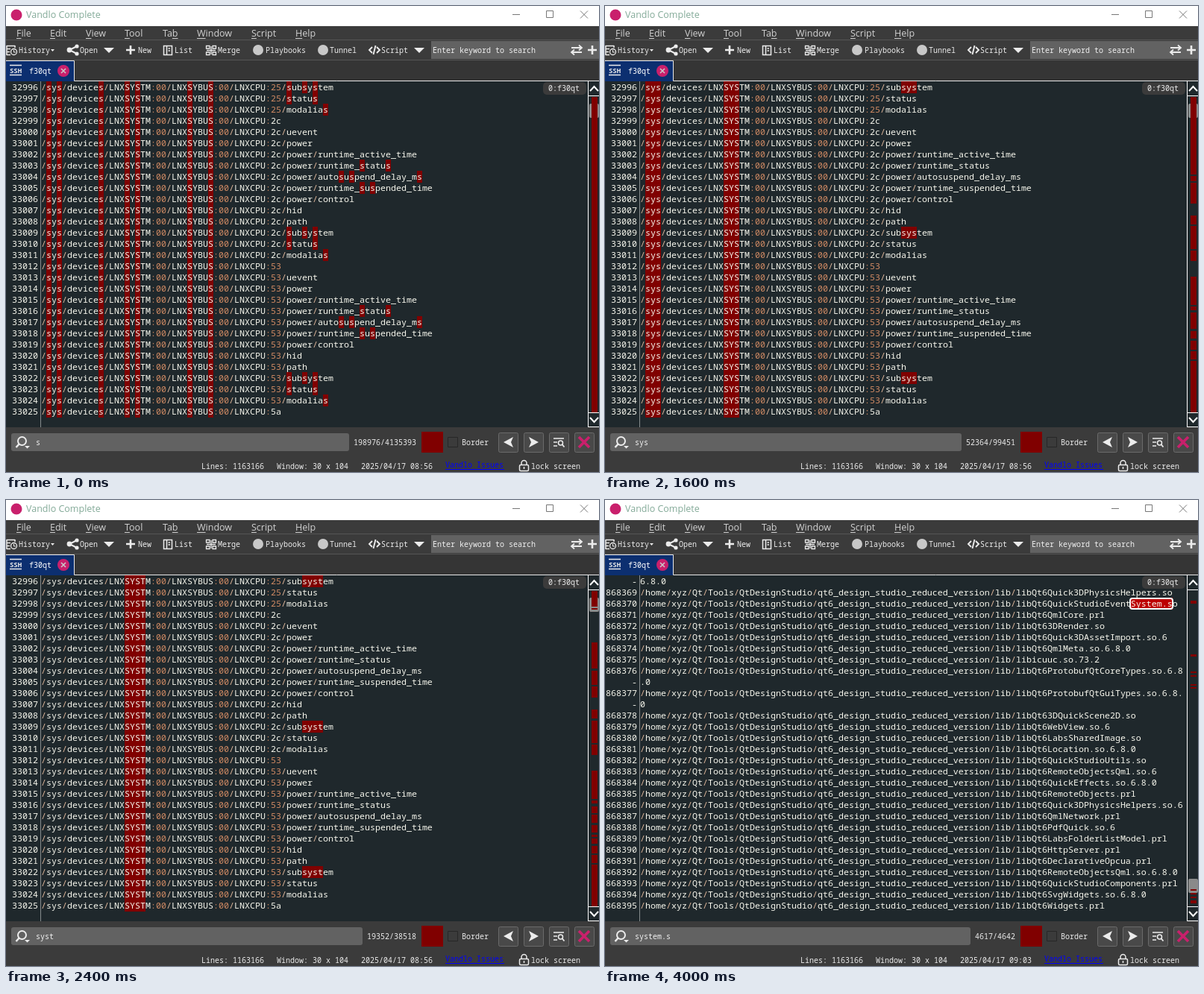
An HTML page with a canvas for the animation above (4800 ms loop, 795 px wide and 625 px high).

```html
<!DOCTYPE html>
<html lang="en">
<head>
<meta charset="utf-8">
<title>Terminal search</title>
<style>
html, body { margin: 0; width: 100%; height: 100%; overflow: hidden; background: #3b3b3b; }
canvas { display: block; }
</style>
</head>
<body>
<canvas id="stage" width="795" height="625"></canvas>
<script>
const ctx = document.getElementById('stage').getContext('2d');
const STEP = 800, COLS = 104, CELL = 7, ROW = 15, LEFT = 47, TOP = 102;
const MONO = '"Noto Sans Mono", "Liberation Mono", monospace';
const SMALL = `10px ${MONO}`, TERM = `11.667px ${MONO}`, UI = '12.5px "Open Sans", sans-serif';
const PANEL = '#3b3b3b', FIELD = '#626262', SCREEN = '#1f282c', RED = '#800000';
const LIGHT = '#ececec', CREAM = '#f8f8ee', ORANGE = '#d08a63', PINK = '#c9206c';

// Search steps: query, hit counter, marks on the scroll bar as [top, bottom].
const FULL = [[122, 545]];
const SYST = [[122, 143], [145, 147], [191, 226], [229, 248], [250, 265], [281, 293], [296, 326],
  [328, 342], [363, 401], [403, 407], [411, 420], [422, 433], [436, 446], [449, 452],
  [454, 461], [464, 474], [476, 487], [489, 545]];
const STEPS = [
  { query: 's', count: '198976/4135393', marks: FULL },
  { query: 'sy', count: '65970/138634', marks: [[122, 226], [228, 234], [236, 265], [281, 325], [328, 545]], caret: true },
  { query: 'sys', count: '52364/99451', marks: [[122, 226], [228, 235], [237, 265], [281, 293], [295, 326],
    [328, 342], [363, 401], [403, 408], [411, 433], [436, 446], [449, 461], [463, 474], [476, 545]] },
  { query: 'syst', count: '19352/38518', marks: SYST },
  { query: 'system', count: '5751/22457', marks: SYST, caret: true, current: true },
  { query: 'system.s', count: '4617/4642', marks: [[135, 139], [207, 210], [230, 232], [235, 237],
    [247, 249], [251, 253], [522, 524], [527, 529], [532, 534], [537, 541]], current: true, library: true }
];

function deviceRows() {
  const power = ['runtime_active_time', 'runtime_status', 'autosuspend_delay_ms', 'runtime_suspended_time', 'control'];
  const parts = ['', '/uevent', '/power', ...power.map(p => '/power/' + p),
    '/hid', '/path', '/subsystem', '/status', '/modalias'];
  const list = ['25', '2c', '53', '5a'].flatMap(id =>
    parts.map(p => `/sys/devices/LNXSYSTM:00/LNXSYBUS:00/LNXCPU:${id}${p}`));
  return list.slice(10, 40).map((text, i) => ({ label: String(32996 + i), text }));
}

function libraryRows() {
  const names = `Quick3DPhysicsHelpers.so QuickStudioEventSystem.so QmlCore.prl 3DRender.so
    Quick3DAssetImport.so.6 QmlMeta.so.6.8.0 libicuuc.so.73.2 ProtobufQtCoreTypes.so.6.8.0
    ProtobufQtGuiTypes.so.6.8.0 3DQuickScene2D.so WebView.so.6 LabsSharedImage.so Location.so.6.8.0
    QuickStudioUtils.so RemoteObjectsQml.so.6 QuickEffects.so.6.8.0 RemoteObjects.prl
    Quick3DPhysicsHelpers.so.6 QmlNetwork.prl PdfQuick.so.6 LabsFolderListModel.prl HttpServer.prl
    DeclarativeOpcua.prl RemoteObjectsQml.so.6.8.0 QuickStudioComponents.prl SvgWidgets.so.6.8.0
    Widgets.prl`.split(/\s+/);
  const rows = [{ label: '-', text: '6.8.0' }];
  names.forEach((name, i) => {
    const file = name.startsWith('lib') ? name : 'libQt6' + name;
    const path = '/home/xyz/Qt/Tools/QtDesignStudio/qt6_design_studio_reduced_version/lib/' + file;
    rows.push({ label: String(868369 + i), text: path.slice(0, COLS) });
    if (path.length > COLS) rows.push({ label: '-', text: path.slice(COLS) });
  });
  return rows;
}

const DEVICES = deviceRows(), LIBRARY = libraryRows();

function rect(x, y, w, h, color) {
  ctx.fillStyle = color;
  ctx.fillRect(x, y, w, h);
}
function text(str, x, y, color = LIGHT, font = SMALL, align = 'left') {
  ctx.font = font;
  ctx.fillStyle = color;
  ctx.textAlign = align;
  ctx.fillText(str, x, y);
}
function round(x, y, w, h, r, fill, stroke, width = 1) {
  ctx.beginPath();
  ctx.roundRect(x, y, w, h, r);
  if (fill) { ctx.fillStyle = fill; ctx.fill(); }
  if (stroke) { ctx.strokeStyle = stroke; ctx.lineWidth = width; ctx.stroke(); }
}
function path(d, color = LIGHT, width = 1.5) {
  ctx.strokeStyle = color;
  ctx.lineWidth = width;
  ctx.stroke(new Path2D(d));
}
function shape(d, color = LIGHT) {
  ctx.fillStyle = color;
  ctx.fill(new Path2D(d));
}
function dot(x, y, r, color = LIGHT) {
  round(x - r, y - r, 2 * r, 2 * r, r, color);
}

function drawTitle() {
  rect(0, 0, 795, 27, '#fff');
  dot(14, 12, 7.5, PINK);
  text('Vandlo Complete', 27, 16, '#83aa98', UI);
  path('M679 11.5H689', '#777', 1);
  path('M724.5 6.5H733.5V15.5H724.5Z', '#777', 1);
  path('M770 6.5L780 16.5M780 6.5L770 16.5', '#777', 1);
}

function drawMenu() {
  const items = [['File', 14, 0], ['Edit', 59, 0], ['View', 107, 0], ['Tool', 159, 0],
    ['Tab', 210, 2], ['Window', 256, 0], ['Script', 329, 0], ['Help', 388, 0]];
  for (const [label, x, key] of items) {
    text(label, x, 41, '#d2d2d2', UI);
    const start = x + ctx.measureText(label.slice(0, key)).width;
    rect(start, 43, ctx.measureText(label[key]).width, 1, '#d2d2d2');
  }
  rect(0, 45, 795, 1, '#555');
}

function drawToolbar() {
  const labels = [['History', 17], ['Open', 99], ['New', 177], ['List', 226], ['Merge', 284],
    ['Playbooks', 348], ['Tunnel', 434], ['Script', 503]];
  for (const [label, x] of labels) text(label, x, 63);

  path('M1 53.5H12M1 57.5H6M1 61.5H5M1 65.5H6M1 53V66M12 53V56');
  round(6.5, 57.5, 8, 8, 4, null, LIGHT, 1.3);
  path('M10.5 59V62H13', LIGHT, 1);
  shape('M60 58H65L62.5 61Z');
  path('M95 54L85 59L95 64', LIGHT, 2);
  dot(85, 59, 3.4); dot(95, 54, 2.6); dot(95, 64, 2.6);
  shape('M131 56H145L138 63Z');
  path('M161 59H173M167 53V65', LIGHT, 2.6);
  path('M211.5 53.5H222.5V65.5H211.5ZM215.5 53V66M217.5 57H220M217.5 60H220');
  path('M268.5 53.5H273V57H268.5ZM277 53.5H281.5V57H277ZM268.5 62H273V65.5H268.5ZM277 62H281.5V65.5H277ZM269 59.5H281M275 54V65', LIGHT, 1.3);
  dot(338, 59, 7, '#c8c8c8');
  dot(425, 59, 7, '#c8c8c8');
  path('M491 55L487 59L491 63M497 55L501 59L497 63M495.5 53L492.5 65', LIGHT, 1.9);
  shape('M547 56H561L554 63Z');

  rect(570, 47, 225, 24, FIELD);
  text('Enter keyword to search', 572, 63, '#f0f0f0');
  path('M758 56H772M768 52.5L772 56L768 59.5M772 62H758M762 58.5L758 62L762 65.5', LIGHT, 1.8);
  path('M780 59H792M786 53V65', LIGHT, 2.6);
  rect(0, 72, 795, 1, '#565656');
}

function drawTabs() {
  rect(0, 73, 795, 28, '#353535');
  rect(0, 73, 91, 28, '#0c2f70');
  path('M0 73.5H91.5V100.5H795', '#e8e8e8', 1);
  path('M5 79.5H21M5 92.5H21', LIGHT, 1.5);
  text('SSH', 13, 89.5, LIGHT, `bold 9px ${MONO}`, 'center');
  text('f30qt', 31, 91, '#fff');
  dot(77, 87, 8, PINK);
  path('M74 84L80 90M80 84L74 90', '#c9c9c9', 1.6);
}

function drawRow({ label, text: line }, i, step, isFirst) {
  const top = TOP + i * ROW, base = top + 11, len = step.query.length;
  const lower = line.toLowerCase();
  const hits = [];
  for (let at = lower.indexOf(step.query); at >= 0; at = lower.indexOf(step.query, at + len)) hits.push(at);

  const current = step.current && isFirst && hits.length > 0;
  for (const at of hits) rect(LEFT + at * CELL, top - 1, len * CELL, ROW + 1, current ? '#bd0000' : RED);
  text(label, 43, base, CREAM, TERM, 'right');
  let end = 0;
  for (const m of line.matchAll(/\/|:(\d+\b)?/g)) {
    text(line.slice(end, m.index), LEFT + end * CELL, base, CREAM, TERM);
    text(m[0], LEFT + m.index * CELL, base, m[0] === '/' ? '#dfb79c' : ORANGE, TERM);
    end = m.index + m[0].length;
  }
  text(line.slice(end), LEFT + end * CELL, base, CREAM, TERM);
  if (current) round(LEFT + hits[0] * CELL - 1, top, len * CELL + 1, ROW - 1, 3, null, '#fff', 2);
  return hits.length > 0;
}

function drawScrollbar(step) {
  rect(780, 101, 15, 464, SCREEN);
  rect(780, 101, 1, 464, '#fff');
  rect(781, 120, 14, 1, '#fff');
  rect(781, 545, 14, 1, '#fff');
  rect(781, 564, 14, 1, '#fff');
  path('M783 114L788.5 108L794 114M783 552L788.5 558L794 552', '#fff', 2);
  round(782, step.library ? 508 : 131, 13, 19, 2, '#8a8a8a');
  for (const [from, to] of step.marks) rect(785, from, 8, to - from, RED);
}

function drawTerminal(step) {
  rect(0, 101, 780, 464, SCREEN);
  let found = false;
  (step.library ? LIBRARY : DEVICES).forEach((row, i) => {
    found = drawRow(row, i, step, !found) || found;
  });
  rect(46, 101, 1, 464, '#868b8d');
  round(720, 102, 58, 17, 5, PANEL);
  text('0:f30qt', 727, 114);
  drawScrollbar(step);
}

function drawSearch(step) {
  const right = 460 + (14 - step.count.length) * 6;
  round(7, 573, right - 7, 24, 3, FIELD);
  round(16, 578, 11, 11, 5.5, null, LIGHT, 2);
  path('M18 587L13.5 592', LIGHT, 2.5);
  shape('M25 590H32L28.5 593.5Z');
  text(step.query, 40, 589, '#f2f2f2');
  if (step.caret) rect(40 + step.query.length * 6, 579, 1, 12, '#f2f2f2');
  text(step.count, 550, 589, LIGHT, SMALL, 'right');

  rect(557, 571, 29, 28, RED);
  path('M592.5 578.5H605.5V591.5H592.5Z', '#272727', 1);
  text('Border', 611, 589);
  for (const x of [660, 694, 728, 762]) round(x + .5, 572.5, 26, 26, 2, '#494949', '#6a6a6a');
  shape('M667 585L680 578L677 585L680 592Z');
  shape('M714 585L701 578L704 585L701 592Z');
  path('M734 580H748M734 585H739M734 590H739', LIGHT, 1.6);
  round(740.5, 583, 6, 6, 3, null, LIGHT, 1.5);
  path('M745.5 588L748.5 591.5', LIGHT, 1.8);
  path('M768 578L782 592M782 578L768 592', PINK, 3.8);
}

function drawStatus(step) {
  text('Lines: 1163166', 262, 621);
  text('Window: 30 x 104', 363, 621);
  text('2025/04/17 ' + (step.library ? '09:03' : '08:56'), 476, 621);
  text('Vandlo Issues', 589, 619, '#0000ff');
  rect(589, 621, 79, 1, '#0000ff');
  round(688.5, 615.5, 12, 8, 1.5, null, LIGHT, 1.5);
  path('M691 615V613A3.5 3.5 0 0 1 698 613V615M694.5 618V621', LIGHT, 1.5);
  text('lock screen', 704, 621);
}

function draw(time) {
  const step = STEPS[Math.floor(time / STEP) % STEPS.length];
  rect(0, 0, 795, 625, PANEL);
  drawTitle();
  drawMenu();
  drawToolbar();
  drawTabs();
  drawTerminal(step);
  drawSearch(step);
  drawStatus(step);
}

function tick() {
  draw(performance.now());
  requestAnimationFrame(tick);
}
tick();
</script>
</body>
</html>
```
